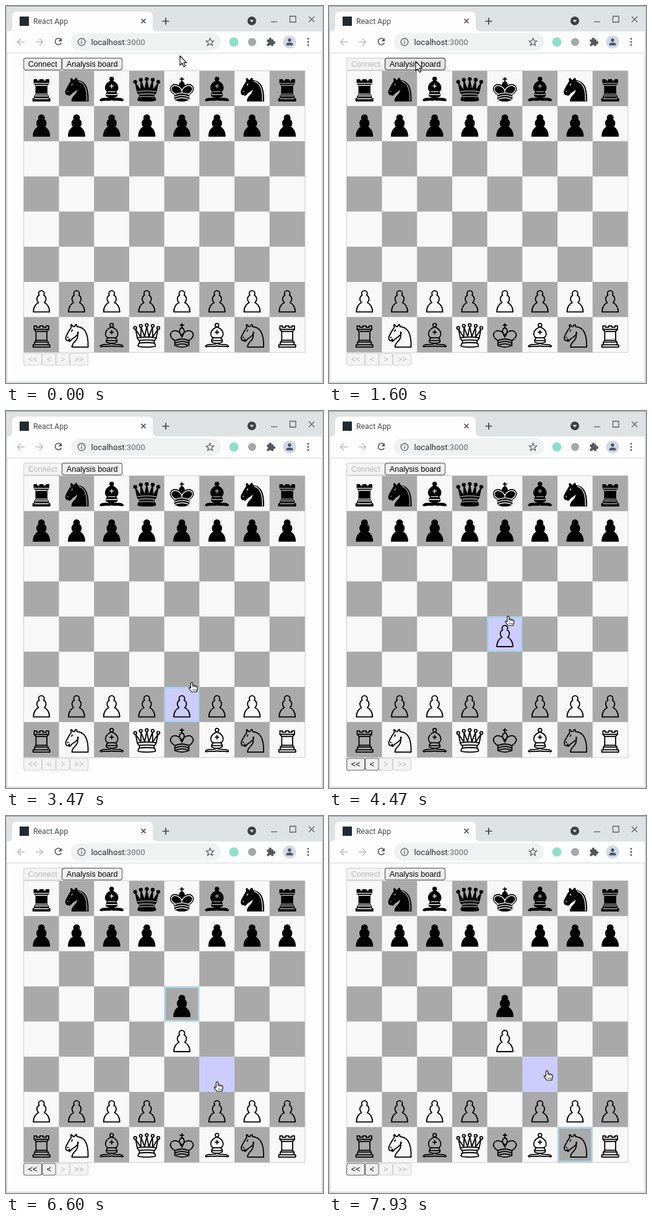
These frames come from a looping animation (512 px wide and 608 px high, 8 s). An HTML page with a canvas:

```html
<!DOCTYPE html>
<html lang="en">
<head>
<meta charset="utf-8">
<title>React App</title>
<style>
  html, body { margin: 0; width: 100%; height: 100%; overflow: hidden; background: #fefefe; }
  canvas { display: block; }
</style>
</head>
<body>
<canvas id="stage" width="512" height="608"></canvas>
<script>
const ctx = document.getElementById('stage').getContext('2d');
const LOOP = 8000, FPS = 15;
const CELL = 56.7, LEFT = 28.9, TOP = 104.8;
const UI = 'Roboto, sans-serif';
const FORM = '12.61px "Liberation Sans", Arial, sans-serif';

// Pointer path: [tick, x, y], 15 ticks per second.
const PATH = [
  [1, 281, 80], [5, 200, 52], [8, 88, 76], [10, 62, 88],
  [15, 62, 88], [19, 96, 79], [24, 140, 89],
  [33, 140, 89], [36, 235, 262], [38, 276, 358], [39, 281, 388], [44, 284, 474],
  [50, 288, 474], [52, 300, 437], [55, 296, 380], [58, 290, 355],
  [66, 290, 355], [70, 288, 255], [75, 285, 194],
  [81, 285, 194], [84, 284, 275], [86, 284, 302],
  [96, 284, 302], [98, 325, 398], [99, 341, 428], [103, 378, 484], [108, 398, 525],
  [111, 398, 525], [115, 372, 460], [119, 352, 410]
];
// Square that holds the focus ring: [tick, column, row].
const FOCUS = [[46, 4, 6], [61, 4, 4], [81, 4, 1], [90, 4, 3], [109, 6, 7]];
// Moves: [tick, column, from row, to row].
const MOVES = [[63, 4, 6, 4], [92, 4, 1, 3]];

// Upper case is white.
const START = ['rnbqkbnr', 'pppppppp', '', '', '', '', 'PPPPPPPP', 'RNBQKBNR'];

const place = (d, ...matrices) => {
  const path = new Path2D();
  for (const m of matrices) path.addPath(new Path2D(d), new DOMMatrix(m));
  return path;
};
const mirror = d => place(d, [1, 0, 0, 1, 0, 0], [-1, 0, 0, 1, 0, 0]);
const shift = d => place(d, [1, 0, 0, 1, -21.5, 0]);

// body: outline, lines: inner strokes, shine: light strokes on black only.
const PIECES = {
  p: {
    body: mirror('M0 9C2.2 9 4 10.8 4 13Q4 14.3 3.2 15.4C5.2 16.5 6.5 18.6 6.5 21Q6.5 24 4.1 26C7.1 27.1 11.5 31.6 11.5 39.3H0')
  },
  r: {
    body: mirror('M0 9H2.3V11H6.8V9H10.4V14L7.8 17V29.5L9.2 32H9.8V36H12V39.3H0'),
    lines: mirror('M0 14H10.4M0 17H7.8M0 29.5H7.8M0 32H9.2M0 36H9.8')
  },
  n: {
    body: shift('M22 10C32.5 11 38.5 18 38 39.3H15C15 30 25 32.5 23 18M24 18C24.4 21 18.5 25.4 16 27C13 29 13.2 31.3 11 31C10 30 12.4 28 11 28C10 28 11.2 29.2 10 30C9 30 6 31 6 26C6 24 12 14 12 14Q13.9 12.1 14 10.5Q13.2 9.5 13.5 7.5C14.5 6.5 16.5 10 16.5 10H18.5Q19.3 8 21 7C22 7 22 10 22 10'),
    lines: shift('M8.6 25.5H9.4M14.5 16.6L15.4 14.9'),
    shine: shift('M24.8 11.3C33 13.5 37 22 36.2 39')
  },
  b: {
    body: mirror('M0 5.5A2.5 2.5 0 0 1 0 10.5M0 10.5C11 14.5 10.5 24.5 5 26Q7.5 27.5 7.5 30Q8 30.5 7.5 32Q5 33.9 0 33.9M0 34C3.4 36.4 10.1 35 13.5 36Q15.2 36.5 16.5 38Q15.5 39.2 13.5 38.5C10.1 37.5 3.4 39 0 37.5'),
    lines: mirror('M0 26H5M0 30H7.5M0 15.5V20.5M0 18H2.5')
  },
  q: {
    body: mirror('M0 6A2 2 0 0 1 0 10M10.5 9a2 2 0 1 1-4 0a2 2 0 1 1 4 0M18.5 12a2 2 0 1 1-4 0a2 2 0 1 1 4 0M0 10L3 24.5L8.2 11L8.5 25L16 13.8L13.5 26C13.5 28 12 28 11 30C10 31.5 10 31 10.5 33.5Q12 34.5 12 36Q13.3 37.5 11.5 38.5Q5.7 39.3 0 39.3'),
    lines: mirror('M13.5 26Q6 24.9 0 24.9M11 30Q8 29.2 0 29.2M10.5 33.5Q5 32.8 0 32.8')
  },
  k: {
    body: mirror('M0 6V12M0 8H2.5M0 12C2 12 3 14.5 3 14.5C4.5 17.5 0 25 0 25M0 23.5C2.5 16 12 13 15.7 19.5C18.5 25.5 10 30 10 30V37Q5 39.3 0 39.3'),
    lines: mirror('M10 30Q5 27.7 0 27.7M10 33.5Q5 31.2 0 31.2M10 37Q5 34.7 0 34.7'),
    shine: mirror('M9.5 29.3C9.5 29.3 17 25.5 14.8 20C11.5 14.5 2.5 18 0 24.5V27')
  }
};

function rect(x, y, w, h, color) {
  ctx.fillStyle = color;
  ctx.fillRect(x, y, w, h);
}

function roundPath(x, y, w, h, r) {
  ctx.beginPath();
  ctx.moveTo(x + r, y);
  ctx.arcTo(x + w, y, x + w, y + h, r);
  ctx.arcTo(x + w, y + h, x, y + h, r);
  ctx.arcTo(x, y + h, x, y, r);
  ctx.arcTo(x, y, x + w, y, r);
  ctx.closePath();
}

function disc(x, y, r, color) {
  ctx.fillStyle = color;
  ctx.beginPath();
  ctx.arc(x, y, r, 0, Math.PI * 2);
  ctx.fill();
}

function line(d, color, width = 1.5) {
  ctx.strokeStyle = color;
  ctx.lineWidth = width;
  ctx.stroke(new Path2D(d));
}

function fill(d, color) {
  ctx.fillStyle = color;
  ctx.fill(new Path2D(d));
}

function text(s, x, y, font, color, align = 'left') {
  ctx.font = font;
  ctx.fillStyle = color;
  ctx.textAlign = align;
  ctx.fillText(s, x, y);
}

function drawTabs() {
  rect(0, 0, 512, 608, '#dee2e3');
  rect(0, 0, 512, 1, '#9a9e9f');
  rect(0, 0, 1, 608, '#c6cacb');
  rect(511, 0, 1, 608, '#c6cacb');
  fill('M2 41Q10 41 10 33V17Q10 9 18 9H229Q237 9 237 17V33Q237 41 245 41Z', '#fefefe');
  rect(22, 17, 15, 15, '#222b33');
  text('React App', 44, 29, '12.3px ' + UI, '#45494d');
  line('M218.5 20.8l7 7m0-7l-7 7', '#3f4347');
  line('M252.5 24.5h11m-5.5-5.5v11', '#3f4347', 1.7);
  disc(397, 24, 7, '#3c4043');
  fill('M393.5 22.5h7l-3.5 4z', '#dee2e3');
  line('M428 25.5h10', '#5b5f62', 1.3);
  line('M458.5 16.5h9.5v9.5h-9.5z', '#5b5f62', 1.3);
  line('M489 17l9 9m0-9l-9 9', '#5b5f62', 1.3);
}

function drawToolbar() {
  const dark = '#54585c', pale = '#bdc0c3';
  rect(2, 41, 508, 34.5, '#fefefe');
  line('M30 58H18.5m5.5-5.5l-5.5 5.5l5.5 5.5', pale, 1.6);
  line('M48 58h11.5m-5.5-5.5l5.5 5.5l-5.5 5.5', pale, 1.6);
  line('M88.6 54A5.2 5.2 0 1 0 89.3 59.4', dark, 1.6);
  fill('M90 51.5v5.6h-5.6z', dark);

  roundPath(105, 44, 242, 28, 14);
  ctx.fillStyle = '#f0f2f2';
  ctx.fill();
  line('M116.2 58a5.8 5.8 0 1 0 11.6 0a5.8 5.8 0 1 0-11.6 0M122 57v4.2M122 54.3v1.5', dark, 1.3);
  const font = '13.24px ' + UI;
  text('localhost', 137.5, 62.5, font, '#27292c');
  text(':3000', 137.5 + ctx.measureText('localhost').width, 62.5, font, '#686c70');

  ctx.beginPath();
  for (let i = 0; i < 10; i++) {
    const a = i * Math.PI / 5 - Math.PI / 2, r = i % 2 ? 2.8 : 6.5;
    ctx.lineTo(329.5 + r * Math.cos(a), 58.3 + r * Math.sin(a));
  }
  ctx.closePath();
  ctx.strokeStyle = dark;
  ctx.lineWidth = 1.2;
  ctx.stroke();

  disc(368, 58, 7.5, '#8fe0cb');
  disc(397.5, 58, 6.5, '#a4a8a8');
  rect(421.5, 54, 10.5, 10.5, dark);
  disc(426.8, 53.3, 2.2, dark);
  disc(433, 59, 2.2, dark);
  disc(421.8, 59.3, 1.6, '#fefefe');
  disc(426.8, 64.3, 1.6, '#fefefe');
  disc(458, 58, 10.5, '#d3dae3');
  disc(458, 55, 2.7, '#47566b');
  fill('M452.5 63.5v-1.5q0-3 5.5-3t5.5 3v1.5z', '#47566b');
  for (const y of [53, 58, 63]) disc(488, y, 1.4, dark);

  rect(2, 75.5, 508, 1, '#d9dcdd');
  rect(2.5, 76.5, 507, 529, '#fefefe');
}

const LOOKS = {
  normal: ['#efefef', '#636363', '#000'],
  hover: ['#e5e5e5', '#4a4a4a', '#000'],
  active: ['#f5f5f5', '#8d8d8d', '#000'],
  disabled: ['#f4f4f4', '#d2d2d2', '#b7b7b7']
};

function button(label, x, y, w, look) {
  const [back, edge, ink] = LOOKS[look];
  roundPath(x + .5, y + .5, w - 1, 19, 2.5);
  ctx.fillStyle = back;
  ctx.fill();
  ctx.strokeStyle = edge;
  ctx.lineWidth = 1.1;
  ctx.stroke();
  text(label, x + w / 2, y + 14.3, FORM, ink, 'center');
}

function drawButtons(tick, [x, y]) {
  const over = (l, r) => x >= l && x < r && y >= 84 && y < 104;
  const look = (hot, pressed) => pressed ? 'active' : hot ? 'hover' : 'normal';
  button('Connect', 28.2, 83.6, 62, tick >= 14 ? 'disabled' : look(over(28, 90), tick === 13));
  button('Analysis board', 90.2, 83.6, 97.8, look(over(90, 188), tick >= 28 && tick < 31));
  let left = 28.2;
  ['<<', '<', '>', '>>'].forEach((label, i) => {
    const w = label.length > 1 ? 29.9 : 22.5;
    button(label, left, 559.7, w, i < 2 && tick >= MOVES[0][0] ? 'normal' : 'disabled');
    left += w;
  });
}

function pointer(tick) {
  const i = PATH.findIndex(p => p[0] > tick);
  if (i === 0) return PATH[0].slice(1);
  if (i < 0) return PATH[PATH.length - 1].slice(1);
  const [t0, x0, y0] = PATH[i - 1], [t1, x1, y1] = PATH[i];
  const k = (tick - t0) / (t1 - t0);
  return [x0 + (x1 - x0) * k, y0 + (y1 - y0) * k];
}

const squareAt = ([x, y]) => [Math.floor((x - LEFT) / CELL), Math.floor((y - TOP) / CELL)];

function drawPiece(name, x, y, back) {
  const { body, lines, shine } = PIECES[name.toLowerCase()];
  const black = name === name.toLowerCase();
  ctx.save();
  ctx.translate(x + CELL / 2, y + 4);
  ctx.scale(1.13, 1.13);
  ctx.lineJoin = ctx.lineCap = 'round';
  ctx.strokeStyle = ctx.fillStyle = '#000';
  ctx.lineWidth = 1.6;
  if (black) ctx.fill(body);
  ctx.stroke(body);
  if (black) {
    ctx.strokeStyle = back;
    ctx.lineWidth = 1.2;
  }
  if (lines) ctx.stroke(lines);
  if (black && shine) ctx.stroke(shine);
  ctx.restore();
}

function drawBoard(tick) {
  const board = START.map(row => [...row.padEnd(8)]);
  for (const [at, col, from, to] of MOVES) {
    if (tick < at) continue;
    board[to][col] = board[from][col];
    board[from][col] = ' ';
  }
  // Highlighting trails the pointer by one tick.
  const [hc, hr] = squareAt(pointer(tick - 1));
  const focus = FOCUS.filter(f => tick >= f[0]).pop();

  rect(LEFT - .9, TOP - .9, CELL * 8 + 1.8, CELL * 8 + 1.8, '#c9c9c9');
  for (let r = 0; r < 8; r++) {
    for (let c = 0; c < 8; c++) {
      const x = LEFT + c * CELL, y = TOP + r * CELL;
      const color = c === hc && r === hr ? '#ccccfd' : (r + c) % 2 ? '#a9a9a9' : '#f8f8f8';
      rect(x, y, CELL, CELL, color);
      if (focus && focus[1] === c && focus[2] === r) {
        ctx.strokeStyle = '#a9d5ea';
        ctx.lineWidth = 2.6;
        ctx.strokeRect(x + 1.3, y + 1.3, CELL - 2.6, CELL - 2.6);
      }
      if (board[r][c] !== ' ') drawPiece(board[r][c], x, y, color);
    }
  }
}

const ARROW = new Path2D('M0 0V15L3.5 11.8L6.1 17.4L8.6 16.3L6.1 10.9H10.6Z');
const HAND = new Path2D('M-1.6 1.6Q0 -.7 1.6 1.6V5.4Q3.2 4.4 4 5.9Q5.8 5 6.6 6.6Q9.2 6 9.2 8.6V10.5L7.8 15.5H-.3L-4.6 9.8Q-4.6 7.3-1.6 9.2Z');
const KNUCKLES = new Path2D('M1.6 5.4V8M4.1 6V8.4M6.6 6.8V8.8M2 11V13.5M4.2 11V13.5M6.3 11V13.5');

function drawPointer([x, y]) {
  const [c, r] = squareAt([x, y]);
  const hand = c >= 0 && c < 8 && r >= 0 && r < 8;
  ctx.save();
  ctx.translate(x, y + .5);
  ctx.lineJoin = 'round';
  ctx.fillStyle = '#fff';
  ctx.strokeStyle = '#111';
  ctx.lineWidth = 1.2;
  ctx.fill(hand ? HAND : ARROW);
  ctx.stroke(hand ? HAND : ARROW);
  if (hand) {
    ctx.lineWidth = .8;
    ctx.stroke(KNUCKLES);
  }
  ctx.restore();
}

function frame(now) {
  const tick = Math.floor((now % LOOP + 4) * FPS / 1000);
  const at = pointer(tick);
  drawTabs();
  drawToolbar();
  drawBoard(tick);
  drawButtons(tick, at);
  drawPointer(at);
}

const began = performance.now();
function run() {
  frame(performance.now() - began);
  requestAnimationFrame(run);
}
run();
</script>
</body>
</html>
```
